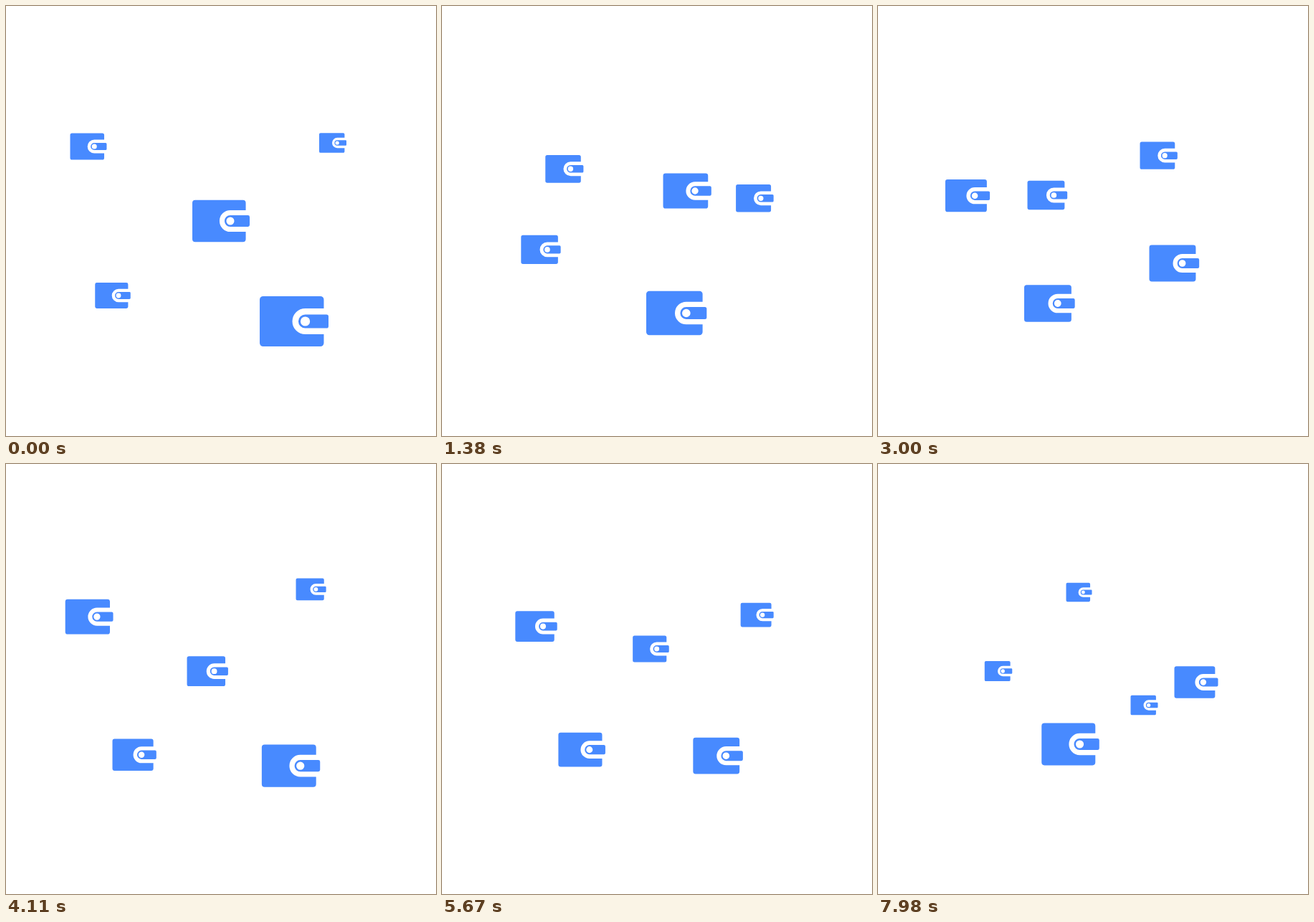
An HTML page with a canvas for the animation above (8 s loop, 600 px wide and 600 px high).

```html
<!DOCTYPE html>
<html lang="en">
<head>
<meta charset="utf-8">
<title>Drifting wallets</title>
<style>
  html, body { margin: 0; width: 100%; height: 100%; overflow: hidden; background: #fff; }
  canvas { display: block; width: 100vw; height: 100vh; }
</style>
</head>
<body>
<canvas id="stage" width="600" height="600"></canvas>
<script>
const ctx = document.getElementById('stage').getContext('2d');
const LOOP = 8000;
const STEP = 30;
const TURN = 4500;
const END = LOOP - STEP + 10;

const pose = (x, y, width) => ({ x, y, width });
const mix = (a, b, k) => a + (b - a) * k;
const between = (p, q, k) =>
  pose(mix(p.x, q.x, k), mix(p.y, q.y, k), mix(p.width, q.width, k));

// A wallet drifts straight to its turning pose, then straight on to its last one.
const drift = (from, turn, to) => t => t < TURN
  ? between(from, turn, t / TURN)
  : between(turn, to, (t - TURN) / (END - TURN));

const wallets = [
  drift(pose(115, 196, 51), pose(297, 298, 58), pose(280.5, 179, 36)),
  drift(pose(456, 191, 38), pose(392, 443, 85.5), pose(371.5, 336.5, 38)),
  drift(pose(300, 300, 80), pose(437.5, 163, 38.5), pose(444, 304.5, 61)),
  drift(pose(149, 404, 49.5), pose(113, 195, 68.5), pose(168, 289, 38.5)),
  drift(pose(402, 440, 96), pose(158, 402.5, 58), pose(268.5, 391, 80.5))
];

// Wallet of width 1 centered on the origin: body, slot, strap and button,
// the last three sharing one center, filled by the even-odd rule.
function makeIcon() {
  const right = 0.432, height = 0.73, corner = 0.05;
  const hub = 0.162, strap = 0.1, slot = 0.188, button = 0.069;
  const icon = new Path2D();
  const tongue = (r, end, round) =>
    icon.roundRect(hub - r, -r, end - hub + r, 2 * r, [r, round, round, r]);
  icon.roundRect(-0.5, -height / 2, right + 0.5, height, corner);
  tongue(slot, right, 0);
  tongue(strap, 0.5, 0.03);
  icon.moveTo(hub + button, 0);
  icon.arc(hub, 0, button, 0, Math.PI * 2);
  return icon;
}

const icon = makeIcon();

function draw(time) {
  const t = Math.floor((time % LOOP) / STEP) * STEP;
  ctx.setTransform(1, 0, 0, 1, 0, 0);
  ctx.fillStyle = '#fff';
  ctx.fillRect(0, 0, 600, 600);
  ctx.fillStyle = '#488aff';
  for (const poseAt of wallets) {
    const { x, y, width } = poseAt(t);
    ctx.setTransform(width, 0, 0, width, x, y);
    ctx.fill(icon, 'evenodd');
  }
}

const start = performance.now();
function tick() {
  draw(performance.now() - start);
  requestAnimationFrame(tick);
}
tick();
</script>
</body>
</html>
```
